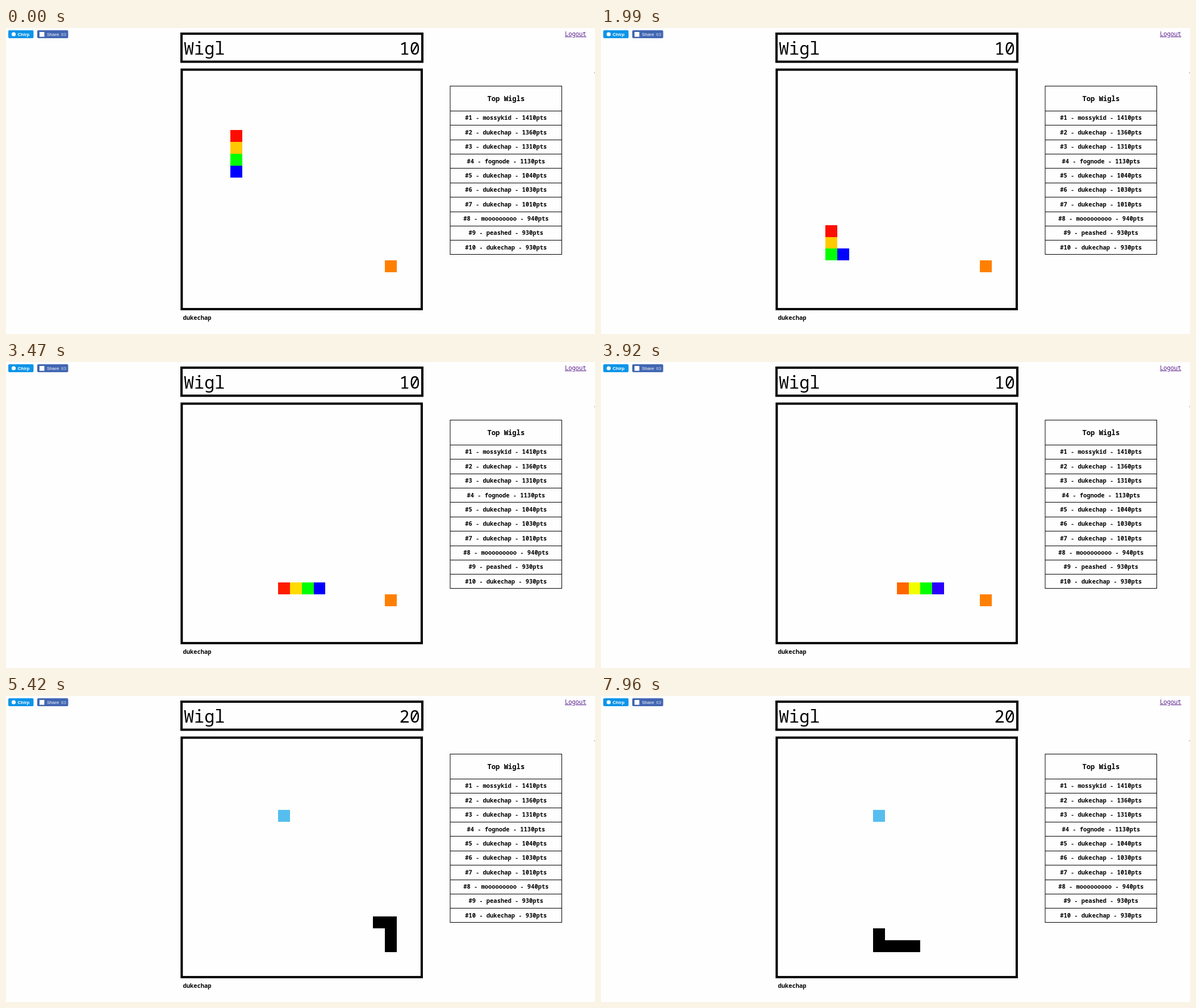
Animation, 1037 px wide and 540 px high, one loop 8000 ms. Source, as an HTML page:

```html
<!DOCTYPE html>
<html lang="en">
<head>
<meta charset="utf-8">
<title>Wigl</title>
<style>
  html, body { margin: 0; width: 100%; height: 100%; overflow: hidden; background: #fefefe; }
  svg { display: block; width: 1037px; height: 540px; }
  text { font-family: "Noto Sans Mono", "DejaVu Sans Mono", monospace; font-size: 10.45px; font-weight: 600; }
  .big { font-size: 30.2px; font-weight: 500; }
  .head { font-size: 12.2px; }
  .mid { text-anchor: middle; }
  .end { text-anchor: end; }
  .link { fill: #551a8b; font-weight: 500; text-decoration: underline; }
  .btn { font: 8px "Liberation Sans", Arial, sans-serif; fill: #fff; }
  .frame { fill: none; stroke: #000; stroke-width: 4; }
  .line { fill: none; stroke: #000; stroke-width: 1; }
  #snake, #food { shape-rendering: crispEdges; }
</style>
</head>
<body>
<svg viewBox="0 0 1037 540">
  <rect x="4" y="4" width="44.5" height="14" rx="2" fill="#0d95e8"/>
  <circle cx="13.5" cy="11" r="3.6" fill="#fff"/>
  <text class="btn" x="20.5" y="13.8" style="font-weight:bold">Chirp</text>
  <rect x="55" y="4" width="54.5" height="14" rx="2" fill="#4267b2"/>
  <rect x="59" y="7" width="8.5" height="8.5" fill="#fff"/>
  <text class="btn" x="72" y="13.8">Share</text>
  <text class="btn" x="97" y="13.8" fill-opacity=".75">63</text>

  <rect class="frame" x="309" y="10" width="424" height="49.5"/>
  <text class="big" x="313" y="47">Wigl</text>
  <text class="big end" id="score" x="728.8" y="47">10</text>

  <rect class="frame" x="309.35" y="73.5" width="422.6" height="422.6"/>
  <rect id="food"/>
  <g id="snake"></g>
  <text x="311.5" y="515">dukechap</text>

  <text class="link" x="984" y="14">Logout</text>
  <rect x="1035.5" y="78" width="1.5" height="2" fill="#bbb"/>

  <g id="table">
    <rect class="line" x="782" y="102.5" width="196.5" height="297"/>
    <text class="head mid" x="880.3" y="129.3">Top Wigls</text>
  </g>
</svg>
<script>
  const NS = 'http://www.w3.org/2000/svg';
  const $ = id => document.getElementById(id);

  function add(parent, tag, attrs, text) {
    const el = document.createElementNS(NS, tag);
    for (const key in attrs) el.setAttribute(key, attrs[key]);
    if (text) el.textContent = text;
    return parent.appendChild(el);
  }

  // Leaderboard
  const scores = [
    ['mossykid', 1410], ['dukechap', 1360], ['dukechap', 1310], ['fognode', 1130], ['dukechap', 1040],
    ['dukechap', 1030], ['dukechap', 1010], ['mooooooooo', 940], ['peashed', 930], ['dukechap', 930]
  ];
  scores.forEach(([name, points], i) => {
    const y = 146 + i * 25.37;
    add($('table'), 'path', { class: 'line', d: `M782 ${Math.round(y) + 0.5}h196.5` });
    add($('table'), 'text', { class: 'mid', x: 880.3, y: y + 16.4 }, `#${i + 1} - ${name} - ${points}pts`);
  });

  // Route of the snake over the 20 x 20 board
  const LOOP = 8000, CELL = 20.93, EATEN = 21, GROWN = 23;
  const route = [[4, 5]];
  for (const [dx, dy, count] of [[0, 1, 10], [1, 0, 13], [0, 1, 2], [-1, 0, 9], [0, -1, 1]]) {
    for (let i = 0; i < count; i++) {
      const [x, y] = route[route.length - 1];
      route.push([x + dx, y + dy]);
    }
  }
  const moves = [
    0, 150, 450, 600, 950, 1100, 1400, 1690, 1990, 2130, 2430, 2720, 2870, 3170, 3470, 3620, 3920,
    4220, 4370, 4670, 4970, 5120, 5420, 5720, 5870, 6170, 6470, 6620, 6920, 7220, 7360, 7660, 7960
  ];

  const colX = col => Math.round(311.32 + CELL * col);
  const rowY = row => Math.round(75.52 + CELL * row);

  function place(el, [col, row], fill) {
    const x = colX(col), y = rowY(row);
    el.setAttribute('x', x);
    el.setAttribute('y', y);
    el.setAttribute('width', colX(col + 1) - x);
    el.setAttribute('height', rowY(row + 1) - y);
    el.setAttribute('fill', fill);
  }

  // Hues settle after each step, listed from tail to head
  function hues(age) {
    const p = Math.min(1, (Math.max(0, 190 - age) / 98) ** 2.5);
    return [24 * p, 39 + 24 * Math.sqrt(p), 112 + Math.min(8, 80 * p), 240 + 13 * Math.max(0, p - 0.25)];
  }

  const cells = Array.from({ length: 5 }, () => add($('snake'), 'rect', {}));
  let last = '';

  function draw(t) {
    let n = moves.length - 1;
    while (moves[n] > t) n--;
    const shown = moves[n] + (t - moves[n] >= 150 ? 150 : 0);
    const key = n + ':' + shown;
    if (key === last) return;
    last = key;

    const eaten = n >= EATEN;
    const tints = hues(shown - 249 * n + 148);
    const body = route.slice(n >= GROWN ? n - 1 : n, n + 4);
    cells.forEach((cell, i) => {
      cell.style.display = body[i] ? '' : 'none';
      if (body[i]) place(cell, body[i], eaten ? '#000' : `hsl(${tints[i].toFixed(1)},100%,50%)`);
    });
    place($('food'), eaten ? [8, 6] : [17, 16], eaten ? '#55beee' : '#ff8000');
    $('score').textContent = eaten ? '20' : '10';
  }

  const start = performance.now();
  function tick() {
    draw((performance.now() - start) % LOOP);
    requestAnimationFrame(tick);
  }
  tick();
</script>
</body>
</html>
```
